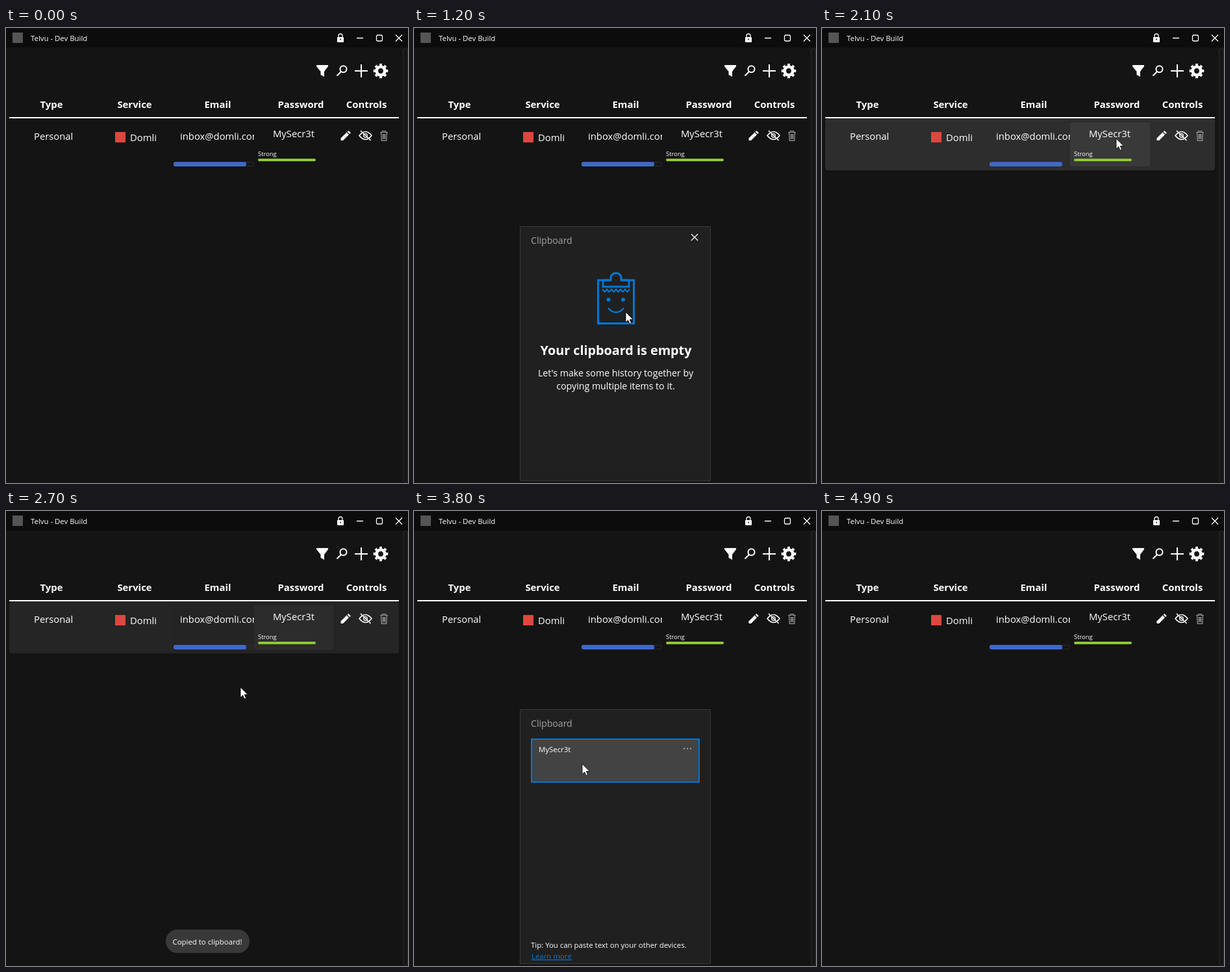
Recreate the animation shown at these times as an HTML page. Size 619 by 700 pixels, loop 5800 ms.

```html
<!DOCTYPE html>
<html lang="en">
<head>
<meta charset="utf-8">
<title>Password manager</title>
<style>
  html, body { margin: 0; width: 100%; height: 100%; overflow: hidden; background: #141414; }
  svg { display: block; }
  text { font: 14.8px "Open Sans", "Noto Sans", sans-serif; fill: #fff; }
  .mid, .head text { text-anchor: middle; }
  .head text { font-size: 14.9px; font-weight: 700; }
  .small { font-size: 11.4px; font-weight: 500; }
  .tiny { font-size: 9.4px; font-weight: 500; }
  .body { font-size: 14.2px; }
  .title { font-size: 19.8px; font-weight: 700; }
  .caption { font-size: 14.1px; fill: #a3a3a3; }
  .link { fill: #0078d7; text-decoration: underline; }
  .white { fill: #fff; }
  .line { fill: none; stroke: #fff; stroke-width: 2; }
  .thin { fill: none; stroke: #fff; stroke-width: 1.3; }
  .blue { fill: none; stroke: #0078d7; stroke-width: 3; }
  .dots { fill: none; stroke-linecap: round; }
</style>
</head>
<body>
<svg width="619" height="700" viewBox="0 0 619 700">
  <rect width="619" height="700" fill="#141414"/>

  <!-- title bar -->
  <rect width="619" height="30" fill="#0c0c0c"/>
  <rect x="10" y="7" width="16" height="16" fill="#555"/>
  <text x="38" y="20" class="small">Telvu - Dev Build</text>
  <rect x="510" y="14" width="10" height="8" rx="1" class="white"/>
  <path class="thin" d="M512 14.5V12a3 3 0 0 1 6 0V14.5"/>
  <circle cx="515" cy="17.5" r="1" fill="#0c0c0c"/>
  <path class="thin" d="M540 15.5H550M600 10.5L610 20.5M610 10.5L600 20.5"/>
  <rect class="thin" x="570.5" y="11" width="9" height="9" rx="2"/>

  <rect x="611.5" y="31" width="7" height="668" rx="3" fill="#161616" stroke="#2b2b2b"/>

  <!-- toolbar -->
  <path class="white" d="M478 57H496V59L490 67V75L484.500 72V67L478 59Z"/>
  <circle class="line" cx="519.500" cy="63.300" r="5"/>
  <path class="line" d="M516 67L509.500 73.500M537 66H557M547 56V76"/>
  <g class="line">
    <circle cx="577" cy="66" r="6.300" style="stroke-width:4.800"/>
    <circle cx="577" cy="66" r="9.600" style="stroke-width:3.400" pathLength="16" stroke-dasharray="1 1" stroke-dashoffset=".5"/>
  </g>

  <g class="head">
    <text x="70" y="123">Type</text>
    <text x="198" y="123">Service</text>
    <text x="326" y="123">Email</text>
    <text x="454" y="123">Password</text>
    <text x="555" y="123">Controls</text>
  </g>
  <rect x="5" y="137" width="600" height="2" class="white"/>

  <!-- entry -->
  <rect x="258.500" y="206.500" width="123" height="6" rx="3" fill="#141414" stroke="#303030"/>
  <g id="hover">
    <rect x="5" y="139" width="600" height="80" rx="4" fill="#2d2d2d"/>
    <rect x="382" y="145" width="123" height="68" rx="4" fill="#393939"/>
  </g>
  <rect x="258" y="206" width="112" height="7" rx="3" fill="#3f69c6"/>
  <text x="43" y="172">Personal</text>
  <rect x="168" y="160" width="16" height="16" fill="#df463f"/>
  <text x="191" y="174">Domli</text>
  <svg x="258" y="150" width="124" height="40"><text x="10" y="22">inbox@domli.com</text></svg>
  <text x="411" y="168">MySecr3t</text>
  <text x="388" y="197" class="tiny">Strong</text>
  <rect x="388" y="201" width="89" height="4" rx="2" fill="#8bc930"/>
  <path class="white" d="M515.500 173V169.500L524.500 160.500 528 164 519 173ZM525.500 159.500L527.500 158 531 161.500 529 163Z"/>
  <path class="line" style="stroke-width:1.700" d="M544 165.500Q553.500 153.500 563 165.500Q553.500 177.500 544 165.500ZM546 158L561.500 173"/>
  <circle class="thin" cx="553.500" cy="165.500" r="2.800"/>
  <path fill="none" stroke="#999" stroke-width="1.2" d="M576 160.500H588M579.500 160V158.500H584.500V160M577.500 161L578.300 173.300H585.700L586.500 161M580.300 163V171M582 163V171M583.700 163V171"/>

  <g id="toast">
    <rect x="246" y="644" width="129" height="36" rx="18" fill="#393939"/>
    <text x="310" y="667" class="small mid">Copied to clipboard!</text>
  </g>

  <g id="panel">
    <rect x="163.500" y="305.500" width="293" height="391" fill="#202020" stroke="#3a3a3a"/>
    <text x="180" y="332" class="caption">Clipboard</text>
    <g id="empty">
      <path class="thin" d="M427 317L437 327M437 317L427 327"/>
      <path class="blue" d="M302 388H283.500V454.500H338.500V388H320"/>
      <path class="blue" d="M291 398V388H303V384a8 7 0 0 1 16 0V388H331V398Z"/>
      <path class="blue" id="zigzag" style="stroke-width:2"/>
      <path class="blue dots" d="M299.500 418h0M322 418h0" style="stroke-width:6"/>
      <path class="blue" d="M299 431Q311 444 323 431" style="stroke-width:2.400"/>
      <text x="311" y="503" class="mid title">Your clipboard is empty</text>
      <text x="310.500" y="536" class="mid body">Let's make some history together by</text>
      <text x="310.500" y="556" class="mid body">copying multiple items to it.</text>
    </g>
    <g id="filled">
      <rect x="181" y="351" width="258" height="66" fill="#434343" stroke="#0078d7" stroke-width="2"/>
      <text x="192" y="371" class="small">MySecr3t</text>
      <path class="dots" d="M416 365.500h0m5 0h0m5 0h0" stroke="#c0c0c0" stroke-width="2"/>
      <text x="180" y="672" class="small">Tip: You can paste text on your other devices.</text>
      <text x="181" y="689" class="small link">Learn more</text>
    </g>
  </g>

  <path id="cursor" d="M0 0V16L3.700 12.600 6 18 8.600 17 6.300 11.600H11.300Z" fill="#fff" stroke="#000" stroke-width=".8"/>
</svg>
<script>
  const LOOP = 5800, TICK = 100;
  const [hover, toast, panel, empty, filled, cursor, zigzag] =
    ['hover', 'toast', 'panel', 'empty', 'filled', 'cursor', 'zigzag'].map(id => document.getElementById(id));

  zigzag.setAttribute('d', 'M290 402' + 'l3.5 4 3.5-4'.repeat(6));

  // Places where the pointer rests or turns; it eases from one to the next.
  const stops = [
    { t: 400, x: 531, y: 400 },
    { t: 700, x: 436, y: 372 },
    { t: 1200, x: 326, y: 437 },
    { t: 1300, x: 253, y: 461 },
    { t: 1800, x: 453, y: 170 },
    { t: 2400, x: 453, y: 170 },
    { t: 2700, x: 361, y: 271 },
    { t: 3300, x: 362, y: 287 },
    { t: 3800, x: 259, y: 389 },
    { t: 4300, x: 310, y: 491 }
  ];

  const clamp = v => Math.max(0, Math.min(1, v));
  const ease = k => k * k * (3 - 2 * k);

  // Opacity of something that fades in after `from` and is gone at `to`.
  const span = (t, from, to, rise, fall) => clamp(Math.min((t - from) / rise, (to - t) / fall));

  function pointer(t) {
    const next = stops.find(stop => stop.t > t) || stops[stops.length - 1];
    const prev = stops[Math.max(0, stops.indexOf(next) - 1)];
    const k = ease(clamp((t - prev.t) / (next.t - prev.t || 1)));
    return [prev.x + (next.x - prev.x) * k, prev.y + (next.y - prev.y) * k].map(Math.round);
  }

  const show = (node, on) => node.setAttribute('visibility', on ? 'visible' : 'hidden');
  const fade = (node, opacity) => node.setAttribute('opacity', opacity);

  function draw(t) {
    const copied = t >= 2500;
    fade(hover, span(t, 1900, 2900, 200, 300));
    fade(toast, span(t, 2400, 3500, 200, 200));
    fade(panel, copied ? span(t, 3400, 4900, 200, 100) : span(t, 100, 2000, 200, 100));
    show(empty, !copied);
    show(filled, copied);
    show(cursor, t >= stops[0].t && t < 4900);
    cursor.setAttribute('transform', `translate(${pointer(t)})`);
  }

  const start = performance.now();
  function frame() {
    const t = (performance.now() - start) % LOOP;
    draw(Math.floor(t / TICK) * TICK);
    requestAnimationFrame(frame);
  }
  frame();
</script>
</body>
</html>
```
